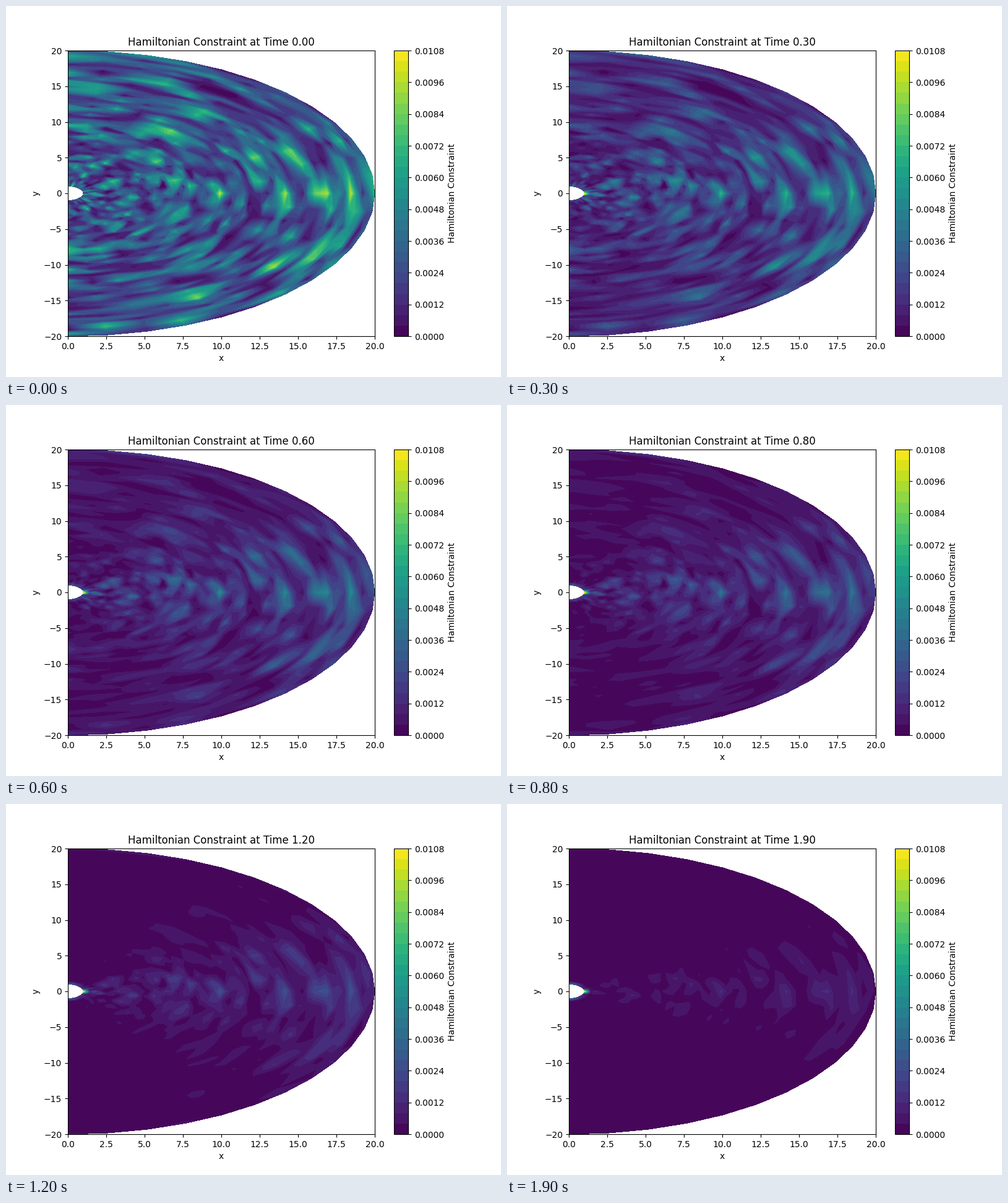
These frames come from a looping animation (800 px wide and 600 px high, 2000 ms). A matplotlib script:

```python
import numpy as np
import matplotlib.pyplot as plt
from matplotlib.animation import FuncAnimation

FRAMES, INTERVAL, DT = 20, 100, 0.1
NR, NT = 50, 25
LEVELS = np.arange(28) * 4e-4
TOP = 0.01078
SIGMA, PEAK = 0.0038, 0.0098

r = np.linspace(1, 20, NR)
theta = np.linspace(-np.pi / 2, np.pi / 2, NT)
R, TH = np.meshgrid(r, theta)
X, Y = R * np.cos(TH), R * np.sin(TH)

# Centres of the main ridges: radius, angle in degrees
RIDGES = [(9.9, 0), (14.1, 0), (16.8, 0), (18.5, 0), (15.7, 19),
          (13.2, 22), (10.9, 56), (18.2, -26), (16.8, -37)]
VALLEY = (17.4, 52)


def bump(radius, degrees, dr, dth):
    """Gaussian weight around one point of the polar grid."""
    angle = np.degrees(TH) - degrees
    return np.exp(-((R - radius) / dr) ** 2 - (angle / dth) ** 2)


def initial_field():
    rng = np.random.default_rng(7)
    noise = rng.normal(size=(NT, NR + 2))
    # Slight radial smoothing, scaled back to unit variance
    noise = noise[:, 1:-1] + 0.35 * (noise[:, :-2] + noise[:, 2:])
    noise /= np.sqrt(1 + 2 * 0.35 ** 2)
    field = PEAK * np.tanh(np.abs(noise) * SIGMA / PEAK)
    for radius, degrees in RIDGES:
        weight = bump(radius, degrees, 0.42, 7)
        field += (PEAK - field) * weight
    return field * (1 - bump(*VALLEY, 0.6, 12))


START = initial_field()

# Decay is slowest along the x axis.
RATE = 1.05 + 1.75 * np.sin(TH) ** 2
RATE[:, -1] = 1.6

# The inner boundary settles towards a steady residual.
GLOW = np.exp(-(theta / 0.2) ** 2)
INNER = 0.0035 * np.sin(theta) ** 2 + TOP * GLOW
SPEED = 1.2 + 10 * GLOW


def constraint(t):
    field = START * np.exp(-RATE * t)
    field[:, 0] += INNER * (1 - np.exp(-SPEED * t))
    return np.clip(field, 0, TOP)


fig, ax = plt.subplots(figsize=(8, 6), dpi=100)


def draw(i):
    t = i * DT
    ax.clear()
    filled = ax.contourf(X, Y, constraint(t), levels=LEVELS, cmap="viridis")
    ax.set(xlim=(0, 20), ylim=(-20, 20), xlabel="x", ylabel="y",
           title=f"Hamiltonian Constraint at Time {t:.2f}")
    return filled


fig.colorbar(draw(0), ax=ax, label="Hamiltonian Constraint")
anim = FuncAnimation(fig, draw, frames=FRAMES, interval=INTERVAL,
                     init_func=lambda: None, repeat=True, repeat_delay=0)
plt.show()
```
